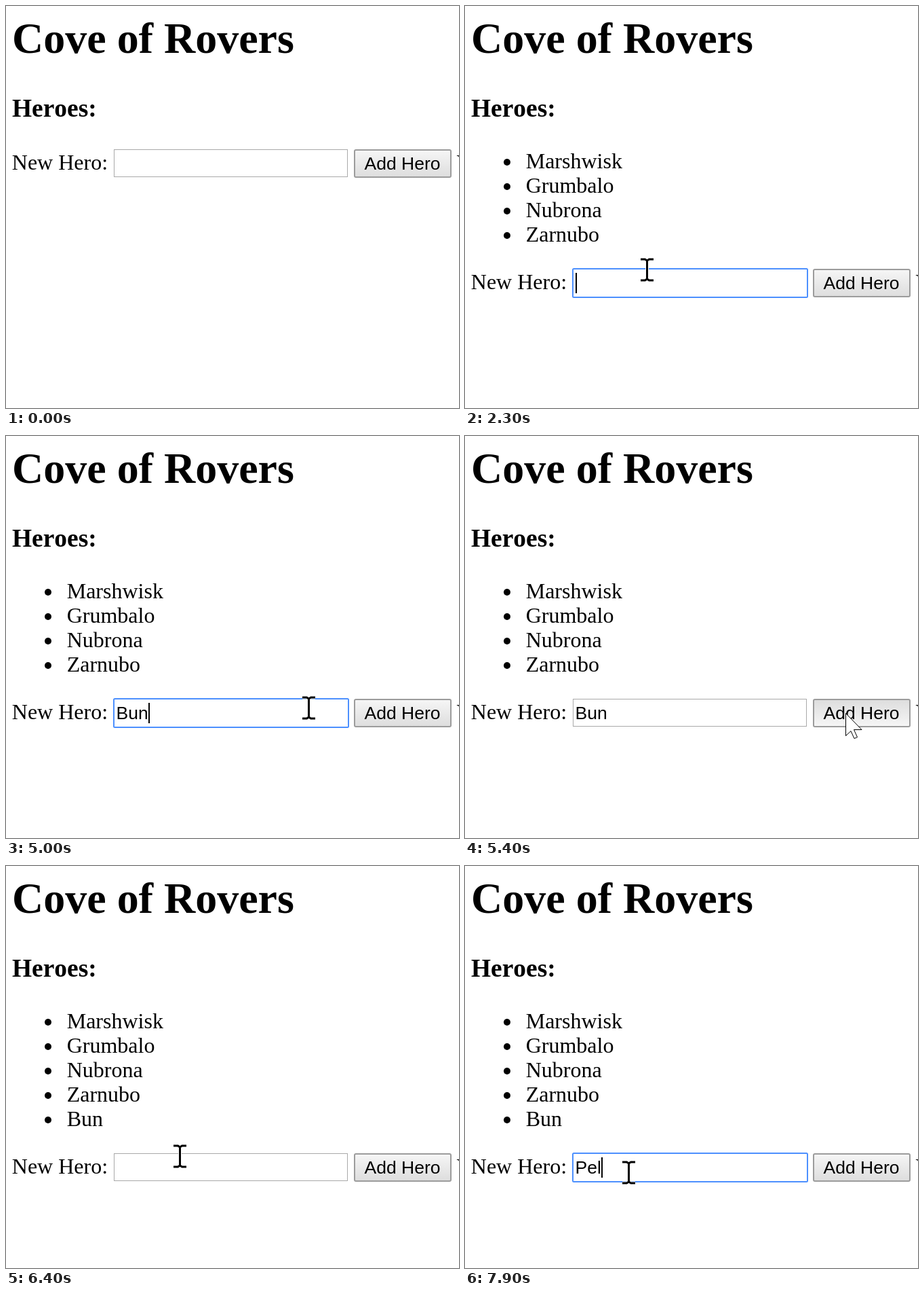
An HTML page for the animation above (8 s loop, 668 px wide and 592 px high).

```html
<!DOCTYPE html>
<html lang="en">
<head>
<meta charset="utf-8">
<title>Cove of Rovers</title>
<style>
html, body { margin: 0; width: 100%; height: 100%; overflow: hidden; background: #fff; }
svg { display: block; width: 668px; height: 592px; }
text { font-family: "Liberation Serif", "Times New Roman", serif; font-kerning: none; white-space: pre; }
.bold { font-weight: bold; }
.ui { font: 26.5px "Liberation Sans", Arial, sans-serif; }
</style>
</head>
<body>
<svg viewBox="0 0 668 592">
  <defs>
    <linearGradient id="raised" x2="0" y2="1">
      <stop stop-color="#f6f6f6"/><stop offset="1" stop-color="#dddddd"/>
    </linearGradient>
    <linearGradient id="pressed" x2="0" y2="1">
      <stop stop-color="#dddddd"/><stop offset="1" stop-color="#f6f6f6"/>
    </linearGradient>
    <path id="beamShape" d="M-9.5 -15.5H-3L0 -13.5L3 -15.5H9.5M0 -14V14M-9.5 15.5H-3L0 13.5L3 15.5H9.5"/>
  </defs>
  <text class="bold" x="9" y="69" font-size="64">Cove of Rovers</text>
  <text class="bold" x="9" y="163" font-size="37.44">Heroes:</text>
  <g id="list" font-size="32"></g>
  <g id="row">
    <text x="8.8" y="30" font-size="32">New Hero:</text>
    <rect id="box" x="159.5" y=".5" width="344" height="40" fill="#fff" stroke="#a9a9a9"/>
    <rect id="ring" x="159" y="0" width="346" height="42" rx="1.5" fill="#fff" stroke="#4d90fe" stroke-width="2"/>
    <text id="entry" class="ui" x="162.5" y="30"></text>
    <rect id="caret" y="6" width="2" height="30"/>
    <rect id="button" x="514" y="1" width="142" height="40" rx="2" stroke="#9c9c9c" stroke-width="2"/>
    <text class="ui" x="528.5" y="30">Add Hero</text>
    <text x="664.5" y="30" font-size="32">V</text>
  </g>
  <g id="beam" fill="none">
    <use href="#beamShape" stroke="#fff" stroke-width="5"/>
    <use href="#beamShape" stroke="#000" stroke-width="3"/>
  </g>
  <path id="arrow" d="M0 0V33L7.5 26L12.5 37L17 35L12 24H23.5Z" fill="#fff" stroke="#000"/>
</svg>
<script>
const LOOP = 8000, STEP = 100;
const heroes = ["Marshwisk", "Grumbalo", "Nubrona", "Zarnubo", "Bun"];
const el = id => document.getElementById(id);
const show = (node, on) => node.setAttribute("visibility", on ? "visible" : "hidden");
const during = (t, ...spans) => spans.some(([a, b]) => t >= a && t < b);
const list = el("list"), row = el("row"), ring = el("ring"), entry = el("entry"),
      caret = el("caret"), button = el("button"), beam = el("beam"), arrow = el("arrow");

list.innerHTML = heroes.map((name, i) =>
  `<g><circle cx="62" cy="${230 + i * 36}" r="5"/>
   <text x="89.7" y="${239 + i * 36}">${name}</text></g>`).join("");

// Pointer moves: start, end, from, to, easing
const easeOut = p => 1 - (1 - p) ** 2;
const smooth = p => p * p * (3 - 2 * p);
const linear = p => p;
const moves = [
  [1600, 2200, [220, 72], [268, 388], easeOut],
  [4600, 5300, [268, 388], [561, 408], smooth],
  [5600, 5900, [561, 408], [470, 431], smooth],
  [5900, 6400, [470, 431], [256, 427], easeOut],
  [6400, 6700, [256, 427], [240, 458], easeOut],
  [6700, 7000, [240, 458], [241, 451], linear]
];

function pointer(t) {
  const [start, end, from, to, ease] = moves.filter(m => t >= m[0]).pop() || moves[0];
  const p = ease(Math.min(1, Math.max(0, (t - start) / (end - start))));
  return from.map((v, i) => v + (to[i] - v) * p);
}

function typed(t) {
  if (t < 5700) return "Bun".slice(0, (t >= 3400) + (t >= 3600) + (t >= 3700));
  return "Pel".slice(0, (t >= 7500) + (t >= 7600) + (t >= 7900));
}

function draw(time) {
  const t = Math.floor(time / STEP) * STEP;
  const count = t < 300 ? 0 : t < 5700 ? 4 : 5;
  const top = 211 + (count && 32 + count * 36);
  [...list.children].forEach((item, i) => show(item, i < count));
  row.setAttribute("transform", `translate(0 ${top})`);

  show(ring, during(t, [2300, 5400], [7000, LOOP]));
  entry.textContent = typed(t);
  caret.setAttribute("x", Math.round(163 + entry.getComputedTextLength()));
  show(caret, during(t, [2300, 2800], [3200, 4200], [4700, 5200], [7000, LOOP]));
  button.setAttribute("fill", `url(#${during(t, [5400, 5500]) ? "pressed" : "raised"})`);

  const [x, y] = pointer(t);
  const overText = y < 90 || (x > 158 && x < 505 && y >= top && y < top + 42);
  const visible = t >= 1600;
  const place = `translate(${Math.round(x) + 0.5} ${Math.round(y) + 0.5})`;
  beam.setAttribute("transform", place);
  arrow.setAttribute("transform", place);
  show(beam, visible && overText);
  show(arrow, visible && !overText);
}

function tick() {
  draw(performance.now() % LOOP);
  requestAnimationFrame(tick);
}
tick();
</script>
</body>
</html>
```
